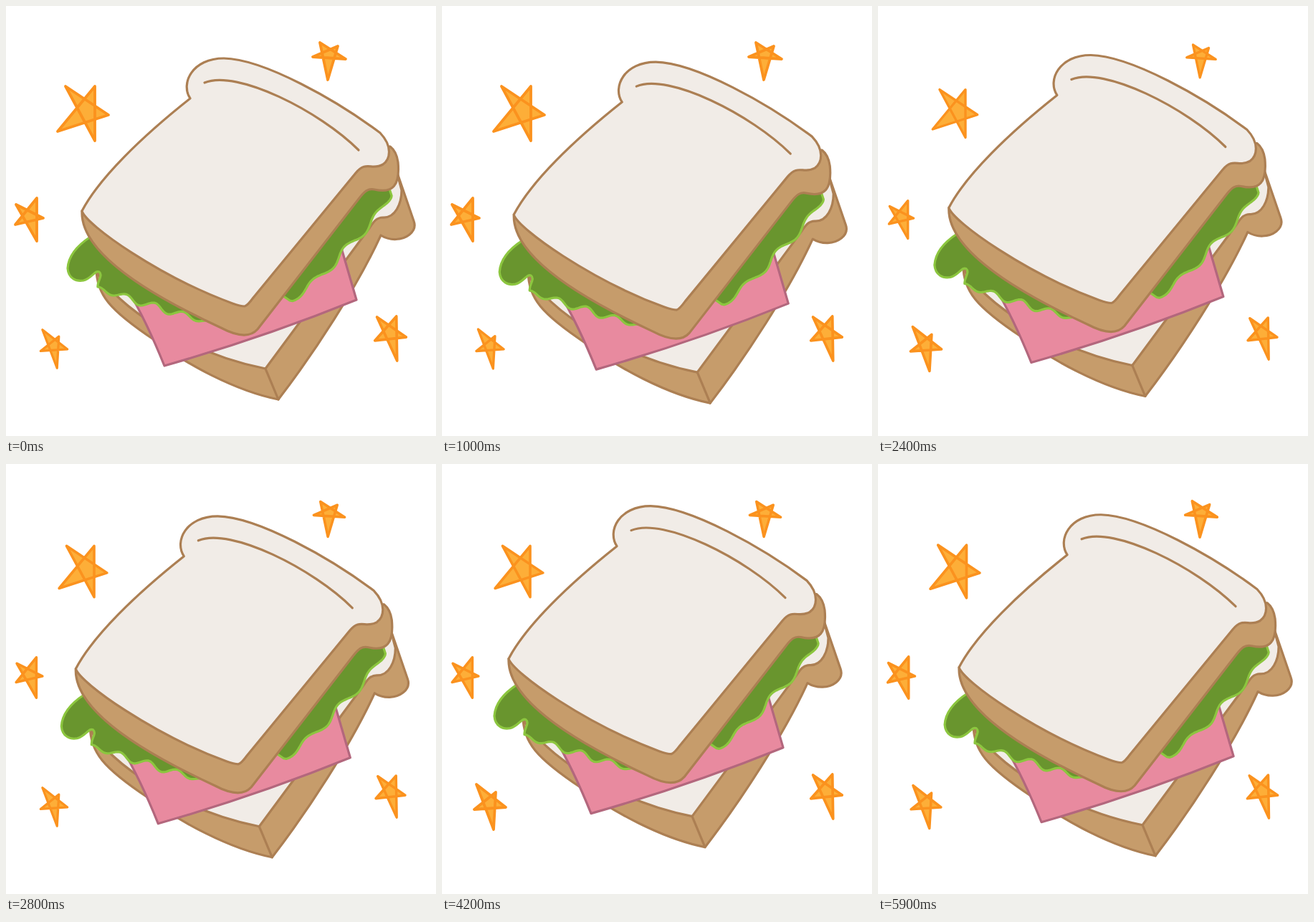
These frames come from a looping animation (600 by 600 pixels, 6 s). An HTML page:

```html
<!DOCTYPE html>
<html lang="en">
<head>
<meta charset="utf-8">
<title>Sandwich</title>
<style>
html, body { margin: 0; width: 100%; height: 100%; overflow: hidden; background: #fff; }
svg { display: block; width: 100vw; height: 100vh; }
path { stroke-width: 3.2; stroke-linejoin: round; stroke-linecap: round; }
.crust { fill: #c69c6b; stroke: #ac7f53; }
.face { fill: #f1ece7; stroke: #ac7f53; }
.line { fill: none; stroke: #ac7f53; }
.ham { fill: #e88a9f; stroke: #b3677d; }
.leaf { fill: #69952e; stroke: #8cc63f; }
.star {
  fill: #fdae38; stroke: #fb921e; stroke-width: 3.8;
  transform-box: fill-box; transform-origin: center;
}
</style>
</head>
<body>
<svg viewBox="0 0 600 600">
  <path class="star" d="M83 112L124 188L124 112L72 175L143 152Z"/>
  <path class="star" d="M438 51L449 103L463 56L428 71L474 74Z"/>
  <path class="star" d="M14 277L43 328L43 268L13 305L52 296Z"/>
  <path class="star" data-peak="100" d="M517 433L546 496L545 432L514 467L559 462Z"/>
  <path class="star" data-peak="467" data-period="933" d="M48 447L72 510L75 458L45 482L89 479Z"/>
  <g id="food">
    <path class="crust" d="M126 366C126 402 144 424 207 466C250 499 320 537 380 549C430 484 490 392 523 320C536 328 553 327 563 319Q573 311 569 300L547 236L300 300Z"/>
    <path class="face" d="M128 374C175 440 280 490 362 506L507 310C513 301 517 295 526 295C543 296 552 276 552 257L546 234L300 300Z"/>
    <path class="line" d="M362 506L380 549"/>
    <path class="ham" d="M170 396Q196 440 221 502Q358 463 489 410L466 331L300 340Z"/>
    <path class="leaf" id="left"/>
    <path class="leaf" id="right"/>
    <path class="crust" d="M106 286C103 350 220 412 300 449Q336 468 351 451L493 268C500 259 505 254 514 256C540 262 550 250 547 218Q545 203 536 196L300 200Z"/>
    <path class="face" d="M106 286C130 240 190 182 257 129C243 108 260 73 304 73C360 74 462 132 522 177C540 196 536 214 526 221C510 230 503 215 488 233L345 407Q337 418 333 419Q327 419 316 415C215 378 112 306 106 286Z"/>
    <path class="line" d="M277 107C322 88 438 147 492 201"/>
  </g>
</svg>
<script>
const LOOP = 6000, STEP = 100, SHRINK = 0.15;

// Turning points of the drift: time, offset
const driftX = [[0, 0], [600, -6.5], [1900, -3], [2700, -9], [3300, -4], [4200, -13], [5400, 8], [6000, 7]];
const driftY = [[0, 0], [600, 9], [1900, -9], [2900, 0], [3900, -13.3], [4800, -17.5], [6000, -2]];

const byId = id => document.getElementById(id);
const food = byId("food");
const stars = [...document.querySelectorAll(".star")];

// Wavy edge from (ax, ay) to (bx, by), fading out at both ends
function frill(ax, ay, bx, by, mean, amp, period, peak) {
  const dx = bx - ax, dy = by - ay, len = Math.hypot(dx, dy);
  let d = "";
  for (let s = 0; s <= len; s += 2) {
    const wave = mean + amp * Math.cos(2 * Math.PI * (s - peak) / period);
    const off = wave * Math.sin(Math.PI * s / len) ** 0.4;
    const side = dx > -dy ? 1 : -1;
    const nx = Math.abs(dy) * (dy > 0 ? -1 : 1), ny = Math.abs(dx);
    d += `L${(ax + (dx * s + nx * off) / len).toFixed(1)} ${(ay + (dy * s + ny * off) / len).toFixed(1)}`;
  }
  return d;
}

byId("left").setAttribute("d",
  "M118 322C98 335 87 350 86 366C87 380 98 385 108 383C120 380 124 368 130 371C136 376 127 384 128 392"
  + frill(128, 392, 285, 440, 3, 5, 42, 20) + "L300 420L150 320Z");
byId("right").setAttribute("d",
  "M380 400" + frill(396, 411, 537, 262, 8.5, 5, 66, 8) + "L530 240L480 240Z");

// Cosine ease between neighbouring turning points
function ease(keys, t) {
  const i = keys.findIndex(k => k[0] > t);
  const [t0, a] = keys[i - 1], [t1, b] = keys[i];
  return a + (b - a) * (1 - Math.cos(Math.PI * (t - t0) / (t1 - t0))) / 2;
}

function pulse({ period = 1000, peak = 0 }, t) {
  const p = (t - peak) / period;
  return 1 - SHRINK * 2 * Math.abs(p - Math.round(p));
}

function draw(time) {
  const t = Math.floor((time % LOOP) / STEP) * STEP;
  food.setAttribute("transform", `translate(${ease(driftX, t)} ${ease(driftY, t)})`);
  for (const s of stars) s.style.transform = `scale(${pulse(s.dataset, t)})`;
}

const start = performance.now();
function tick() {
  draw(performance.now() - start);
  requestAnimationFrame(tick);
}
tick();
</script>
</body>
</html>
```
